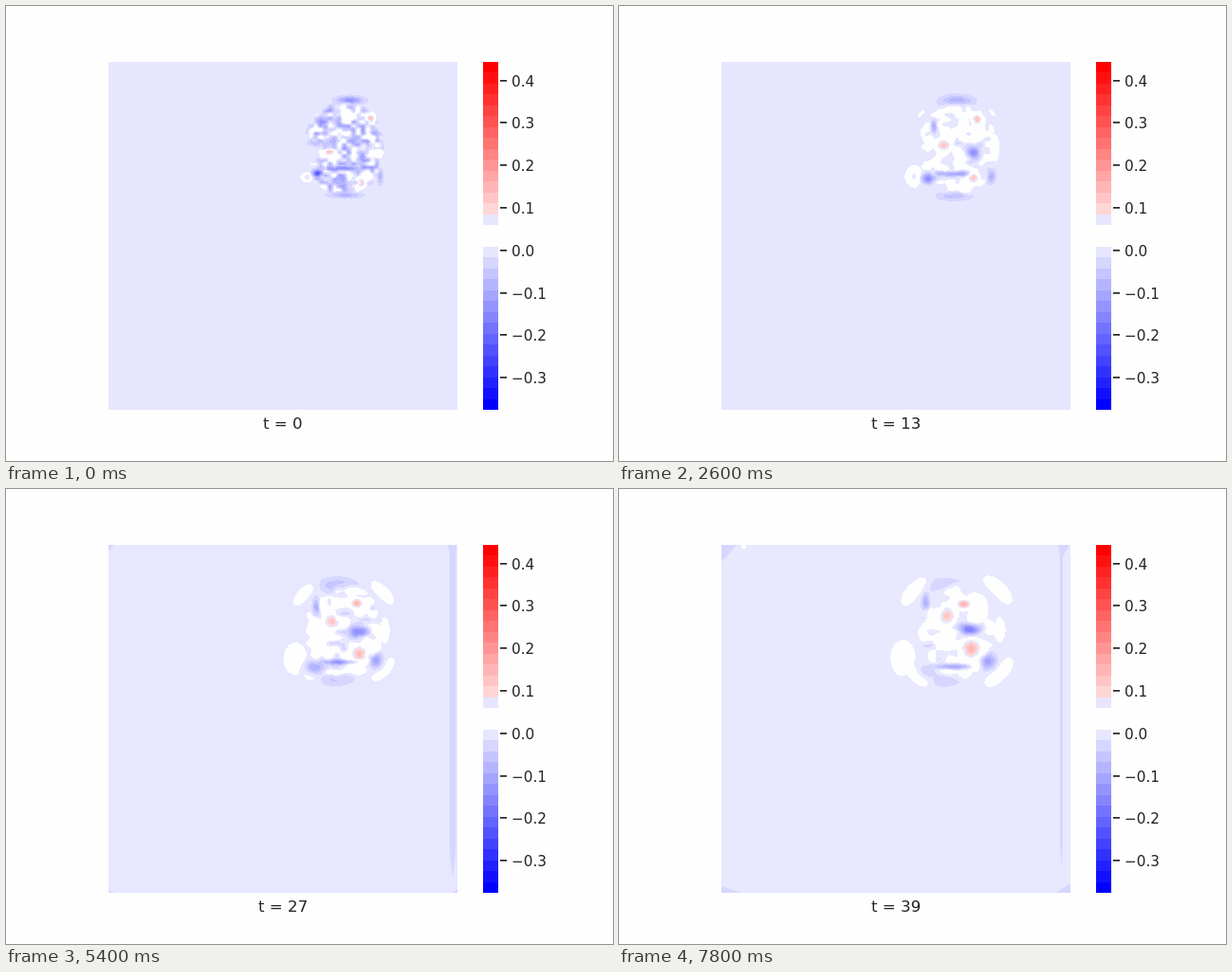
An HTML page with a canvas for the animation above (8 s loop, 640 by 480 pixels).

```html
<!DOCTYPE html>
<html lang="en">
<head>
<meta charset="utf-8">
<title>Residual heat map</title>
<style>
  html, body { margin: 0; width: 100%; height: 100%; overflow: hidden; background: #fefefe; }
  canvas { display: block; }
</style>
</head>
<body>
<canvas id="stage" width="640" height="480"></canvas>
<script>
const ctx = document.getElementById('stage').getContext('2d');
const STEP_MS = 200, STEPS = 40, LEVELS = 32;
const PANEL = { x: 108, y: 59, w: 368, h: 367 };
const BOX = { x: 282, y: 86, w: 144, h: 142 };
const CENTER = { x: 356, y: 150 };
const BASE = 14.5; // contour level of the empty panel

const mix = (a, b, k) => a + (b - a) * k;
const clamp = v => Math.max(0, Math.min(1, v));
const css = rgb => `rgb(${rgb.join()})`;

// A spot drifts and spreads from its first pose [x, y, rx, ry, height] to its last.
const spot = (first, last) => progress => first.map((v, i) => mix(v, last[i], progress));
const spots = {
  topCap: spot([362, 99, 13, 4, -5], [343, 102, 20, 9, -1.3]),
  bottomCap: spot([357, 199, 16, 3, -3], [343, 201, 18, 8, -1.1]),
  leftTip: spot([317, 180, 5, 4, 3.6], [299, 178, 13, 19, 1.4]),
  lowerCurl: spot([328, 176, 5, 4, -9], [323, 193, 13, 8, -1.3]),
  lowerBar: spot([352, 171, 20, 3, -6], [351, 187, 18, 3, -5]),
  upperLeft: spot([336, 131, 3, 8, -4.5], [323, 119, 4, 9, -3.5]),
  waistRight: spot([375, 157, 5, 8, -4.5], [370, 147, 11, 6, -7.5]),
  lowerRight: spot([394, 179, 3, 8, -3], [388, 181, 8, 8, -4.5]),
  waistRed: spot([340, 153, 7, 4, 5], [345, 133, 9, 10, 5]),
  upperRed: spot([384, 118, 4, 5, 5], [363, 121, 7, 5, 6.5]),
  lowerRed: spot([374, 186, 4, 5, 5], [371, 168, 10, 10, 6]),
  rightEdge: spot([393, 150, 4, 14, 1.7], [401, 148, 6, 13, 1.4])
};

const hash = (x, y, z) => {
  const v = Math.sin(x * 127.1 + y * 311.7 + z * 74.7) * 43758.5453;
  return v - Math.floor(v);
};

function layer(x, y, z) {
  const i = Math.floor(x), j = Math.floor(y);
  return mix(mix(hash(i, j, z), hash(i + 1, j, z), x - i),
             mix(hash(i, j + 1, z), hash(i + 1, j + 1, z), x - i), y - j) * 2 - 1;
}

function noise(x, y, z) {
  const k = Math.floor(z);
  return mix(layer(x, y, k), layer(x, y, k + 1), z - k);
}

const bell = (x, y, cx, cy, rx, ry) => Math.exp(-(((x - cx) / rx) ** 2) - ((y - cy) / ry) ** 2);

// Round body of the digit, with the notch at its left side closing over time.
function bodyMask(x, y, progress) {
  const edge = 1 - ((x - CENTER.x) / 44) ** 2 - ((y - CENTER.y) / 53) ** 2;
  const notch = bell(x, y, 316, 156, 16, 13) * (1 - progress);
  return clamp(edge * 3) * clamp(1 - 1.5 * notch);
}

// White wave front, broken into arcs, that leaves the body late in the loop.
function waveFront(x, y, progress) {
  const dx = x - CENTER.x, dy = y - CENTER.y;
  const ring = (Math.hypot(dx, dy) - mix(48, 63, progress)) / 7;
  return 1.6 * progress * Math.exp(-ring * ring) * Math.cos(4 * Math.atan2(dy, dx) + 3.2);
}

function fieldAt(x, y, t, poses) {
  const progress = t / (STEPS - 1), settled = clamp(t / 12);
  const size = mix(5, 9, progress);
  const grain = bodyMask(x, y, progress) * (mix(-0.7, 1, settled) +
    mix(4.5, 2.6, settled) * noise((x - CENTER.x) / size, (y - CENTER.y) / (size * 0.8), t / 9));
  let high = Math.max(0, Math.min(grain, 2.3), waveFront(x, y, progress));
  let low = Math.min(0, grain);
  for (const [cx, cy, rx, ry, height] of poses) {
    const v = height * bell(x, y, cx, cy, rx, ry);
    high = Math.max(high, v);
    low = Math.min(low, v);
  }
  return BASE + high + low;
}

function levelColor(level, empty) {
  if (level === 15 || level === 16) return [254, 254, 254];
  if (level === 14 || level === 17) return [empty, empty, 255];
  const v = Math.round(Math.min(level, LEVELS - 1 - level) * 255 / 15.5);
  return level < 15 ? [v, v, 255] : [255, v, v];
}

function drawField(t, empty) {
  const poses = Object.values(spots).map(pose => pose(t / (STEPS - 1)));
  const colors = Array.from({ length: LEVELS }, (_, i) => levelColor(i, empty));
  const image = ctx.createImageData(BOX.w, BOX.h);
  for (let p = 0; p < BOX.w * BOX.h; p++) {
    const value = fieldAt(BOX.x + p % BOX.w, BOX.y + Math.floor(p / BOX.w), t, poses);
    const level = Math.max(0, Math.min(LEVELS - 1, Math.floor(value)));
    image.data.set(colors[level], p * 4);
    image.data[p * 4 + 3] = 255;
  }
  ctx.putImageData(image, BOX.x, BOX.y);
}

function polygon(...points) {
  ctx.beginPath();
  for (const [x, y] of points) ctx.lineTo(x, y);
  ctx.fill();
}

// Faint strip and corners creeping in from the panel's borders.
function drawBorders(t) {
  const left = PANEL.x, top = PANEL.y, right = left + PANEL.w, bottom = top + PANEL.h;
  const corner = (x, y, w, h) => polygon([x, y], [x + w, y], [x, y + h]);
  const late = clamp((t - 27) / 12), grow = clamp((t - 20) / 19);
  ctx.fillStyle = css(levelColor(13));
  if (t > 16) {
    const inner = mix(mix(475, 468, clamp((t - 17) / 10)), 465, late);
    const outer = mix(474, 468, late), end = mix(410, 399, late);
    polygon([inner - 2, top], [475, top], [outer, top + 12], [outer, end - 25],
            [(inner + outer) / 2, end], [inner, end - 25], [inner, top + 10]);
  }
  corner(left, top, 16 * grow, 18 * grow);
  corner(left, bottom, 20 * grow, -7 * grow);
  corner(right, bottom, -16 * grow, -10 * grow);
  ctx.fillStyle = '#fefefe';
  ctx.fillRect(129, top, 5, 4 * clamp((t - 34) / 5));
}

function drawColorbar() {
  const edge = i => Math.round(PANEL.y + i * PANEL.h / LEVELS);
  for (let i = 0; i < LEVELS; i++) {
    ctx.fillStyle = css(levelColor(LEVELS - 1 - i, 230));
    ctx.fillRect(503, edge(i), 16, edge(i + 1) - edge(i));
  }
  ctx.fillStyle = '#262626';
  ctx.font = '15.28px "DejaVu Sans", sans-serif';
  for (let value = 4; value >= -3; value--) {
    const y = Math.round(78.7 + (4 - value) * 44.77);
    ctx.fillRect(521, y - 1, 7, 1.7);
    ctx.fillText((value < 0 ? '\u2212' : '') + (Math.abs(value) / 10).toFixed(1), 533, y + 6);
  }
}

function drawTitle(text) {
  ctx.font = '16.67px "DejaVu Sans", sans-serif';
  ctx.fillText(text, Math.round(292 - ctx.measureText(text).width / 2), 446);
}

function draw(t) {
  const empty = Math.round(mix(230, 232, clamp((t - 20) / 19)));
  ctx.fillStyle = '#fefefe';
  ctx.fillRect(0, 0, 640, 480);
  ctx.fillStyle = css([empty, empty, 255]);
  ctx.fillRect(PANEL.x, PANEL.y, PANEL.w, PANEL.h);
  drawBorders(t);
  drawField(t, empty);
  drawColorbar();
  drawTitle('t = ' + t);
}

let shown = -1;
function tick() {
  const t = Math.floor(performance.now() / STEP_MS) % STEPS;
  if (t !== shown) draw(shown = t);
  requestAnimationFrame(tick);
}
tick();
</script>
</body>
</html>
```
